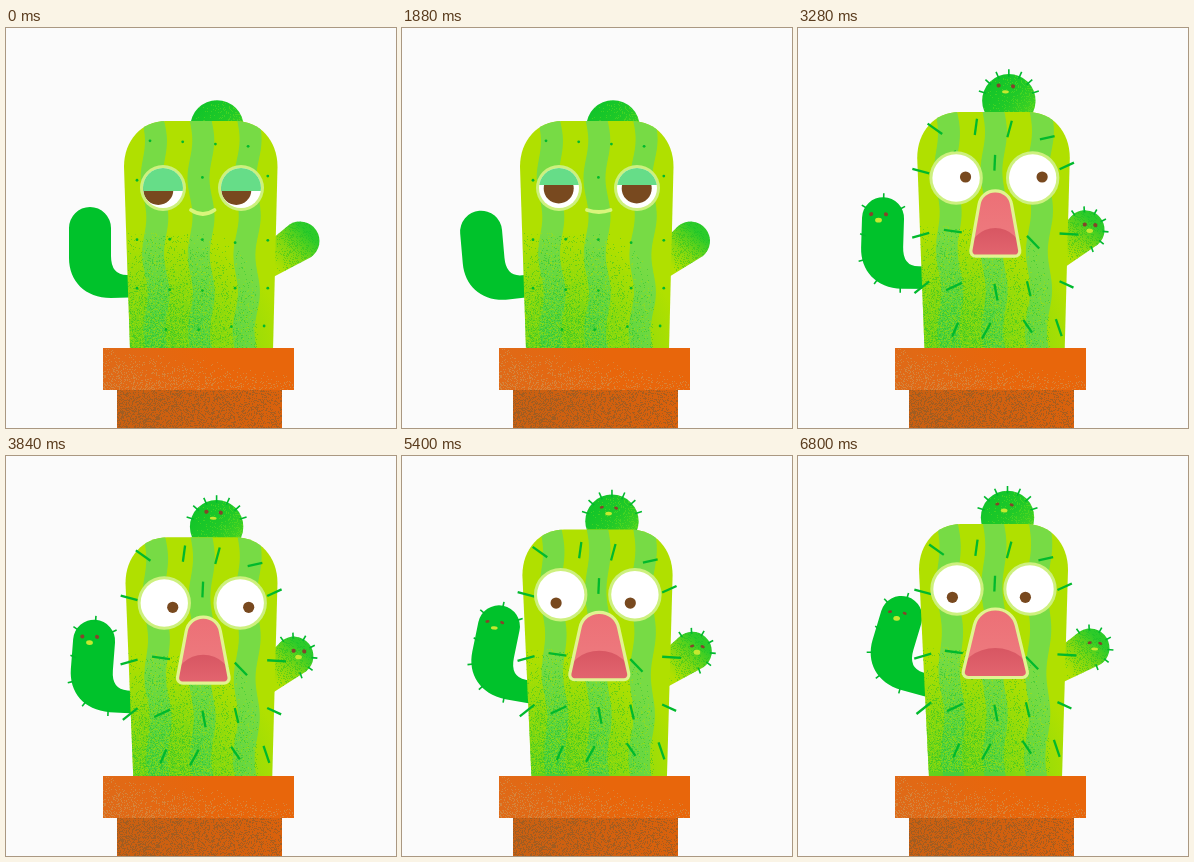
Recreate the animation shown at these times as an HTML page with a canvas. Size 390 by 400 pixels, loop 7000 ms.

```html
<!DOCTYPE html>
<html lang="en">
<head>
<meta charset="utf-8">
<title>Cactus</title>
<style>
html, body { margin: 0; width: 100%; height: 100%; overflow: hidden; background: #fbfbfb; }
canvas { display: block; width: 390px; height: 400px; }
</style>
</head>
<body>
<canvas id="stage"></canvas>
<script>
const LOOP = 7000, STEP = 40, LAST = 6800, JUMP = 2200;
const GREEN = '#00c22b', LIME = '#b0e000', STRIPE = '#77db45', SPIKE = '#00b92d', RING = '#cdf07e', BROWN = '#78491f';
const SOIL_Y = 322;

const canvas = document.getElementById('stage');
const dpr = window.devicePixelRatio || 1;
canvas.width = 390 * dpr;
canvas.height = 400 * dpr;
const c = canvas.getContext('2d');

const clamp = v => Math.max(0, Math.min(1, v));
const ramp = (t, a, b) => clamp((t - a) / (b - a));
const smooth = (t, a, b) => { const k = ramp(t, a, b); return k * k * (3 - 2 * k); };
const lerp = (a, b, k) => a + (b - a) * k;
const rad = deg => deg * Math.PI / 180;

// Calm, then a jolt upwards, a drop into a gasp, and a long slow strain
function poseAt(t) {
  const jump = 1 - (1 - ramp(t, JUMP, 2480)) ** 2;
  const drop = smooth(t, 2480, 2800);
  const strain = ramp(t, 2900, 6480);
  const sway = smooth(t, 0, 1900);
  const wake = smooth(t, 480, 840);
  const key = (calm, jolt, gasp, end) => lerp(lerp(calm, jolt, jump), lerp(gasp, end, strain), drop);
  const roll = rad(lerp(-6, 119, ramp(t, 3280, 5400)));
  return {
    top: key(93, 57, 86, 68),
    left: key(118, 119, 119, 121),
    right: key(271.5, 274.5, 272, 270),
    baseL: key(124, 132.5, 126, 131),
    baseR: key(267, 262, 267, 264),
    headX: key(211, 213, 211, 209.5),
    headY: key(99, 46, 74, 61.5),
    faceY: key(99, 44, 59, 48.5),
    armX: key(124, 127, 123, 125),
    armY: key(258, 218, 252, 228),
    armRot: rad(key(-5 * sway, 3, 0, 16.7)),
    tipX: key(294 - 5.5 * sway, 292, 286.5, 292),
    tipY: key(213, 198, 203, 192),
    rootY: key(237, 219, 229, 213),
    eyeY: key(160, 140, 152, 133),
    eyeL: key(157, 158, 158, 159),
    eyeR: key(235, 235, 235, 232),
    eyeSize: key(23, 23.5, 26.7, 26.7),
    lookX: lerp(lerp(lerp(-4.7, -0.3, wake), 6.5, jump), 9.5 * Math.cos(roll), drop),
    lookY: lerp(lerp(2, 0.5, wake), 9.5 * Math.sin(roll), drop),
    iris: key(15, 10, 5.6, 5.6),
    lid: lerp(lerp(3, -3, wake), -27, jump),
    smile: lerp(4, 2, wake),
    spikeY: key(7, -13, 1, -7),
    squeeze: key(1, 1, 1, 0.965),
    mTop: key(181, 159.5, 164, 153),
    mBot: key(187, 200.5, 229, 221.5),
    mTopW: key(6, 10, 13.5, 17),
    mBotW: key(13, 17, 24.5, 33.5)
  };
}

let seed = 7;
const random = () => (seed = (seed * 16807) % 2147483647) / 2147483647;

// Sprayed specks, denser where density(u, v) is higher
function grain(w, h, color, density) {
  const layer = document.createElement('canvas');
  layer.width = w;
  layer.height = h;
  const g = layer.getContext('2d');
  g.fillStyle = color;
  for (let y = 0; y < h; y++) {
    for (let x = 0; x < w; x++) {
      if (random() < density(x / w, y / h)) g.fillRect(x, y, 1, 1);
    }
  }
  return layer;
}
const spray = (u, v) => 0.34 * clamp(1.15 - Math.hypot((u - 0.25) * 1.2, 1 - v));
const bodyDark = grain(130, 125, 'rgba(30,190,45,.45)', spray);
const bodyLight = grain(130, 125, 'rgba(176,224,0,.5)', spray);
const headGrain = grain(54, 54, 'rgba(110,225,30,.45)', (u, v) => 0.35 * u * (0.4 + v));
const tipGrain = grain(50, 54, 'rgba(20,190,40,.4)', u => 0.3 * clamp(1.2 - Math.abs(u - 0.45) * 2));
const rimGrain = grain(191, 42, 'rgba(205,150,85,.6)', (u, v) => 0.3 * clamp(v * 1.1 - u * 0.75 + 0.1));
const potGrain = grain(165, 38, 'rgba(120,90,50,.5)', (u, v) => 0.38 - 0.15 * u + 0.05 * v);

// Staggered rows of spikes fanning out from the middle of the body
const spikes = [];
[108, 143, 205, 257, 292].forEach((y, row) => {
  const wide = row > 0 && row < 4;
  const first = wide ? 131 : 144 + row * 4;
  for (let i = 0; i < (wide ? 5 : 4); i++) {
    const x = first + 32.7 * i;
    const a = Math.atan2(y - 185, (x - 193) * 1.8) + (i % 2 ? 0.5 : -0.1);
    const len = 15 + 4 * random();
    spikes.push({ x, y: y + 8 * random() - 4, dx: Math.cos(a) * len, dy: Math.sin(a) * len });
  }
});

function fill(style) { c.fillStyle = style; c.fill(); }
function disc(x, y, r, style) {
  c.beginPath();
  c.arc(x, y, r, 0, 7);
  fill(style);
}
function line(x, y, dx, dy, width = 2.3) {
  c.lineWidth = width;
  c.strokeStyle = SPIKE;
  c.beginPath();
  c.moveTo(x, y);
  c.lineTo(x + dx, y + dy);
  c.stroke();
}
function gradient(x0, y0, x1, y1, ...colors) {
  const g = c.createLinearGradient(x0, y0, x1, y1);
  colors.forEach((color, i) => g.addColorStop(i / (colors.length - 1), color));
  return g;
}
function isolated(draw) {
  c.save();
  draw();
  c.restore();
}
// Evenly spread short spikes on an arc; degrees run clockwise from the top
function ringSpikes(x, y, r, from, to, count, len) {
  if (len <= 0) return;
  for (let i = 0; i < count; i++) {
    const a = rad(lerp(from, to, i / (count - 1)) - 90);
    const dx = Math.cos(a), dy = Math.sin(a);
    line(x + dx * r, y + dy * r, dx * len, dy * len, 1.6);
  }
}

function smallFace(x, y, gap, tilt, t, phase) {
  isolated(() => {
    c.translate(x, y);
    c.rotate(tilt);
    for (const side of [-1, 1]) {
      c.beginPath();
      c.ellipse(side * gap, 0, 2.1, t > 4000 ? 1.4 : 2, side * 0.3, 0, 7);
      fill('#84452a');
    }
    c.beginPath();
    c.ellipse(0, 6, 3.4, 2 + 0.5 * Math.sin(t / 90 + phase), 0, 0, 7);
    fill('#c5e82f');
  });
}

function drawHead(p, t) {
  const { headX: x, headY: y } = p;
  disc(x, y, 26.7, gradient(x - 20, y - 20, x + 22, y + 20, '#10c42a', '#20c928', '#4bd421'));
  isolated(() => {
    c.clip();
    c.drawImage(headGrain, x - 27, y - 27);
  });
  ringSpikes(x, y, 24, -72, 72, 7, 7.5 * ramp(t, 2300, 2420));
  const jolt = 1 - ramp(t, 2480, 2800);
  if (t >= 2400) smallFace(x - 3, p.faceY, 7.2, 0.06 + 0.2 * jolt, t, 0);
}

function drawLeftArm(p, t) {
  isolated(() => {
    c.translate(p.armX, p.armY);
    c.rotate(p.armRot);
    c.translate(-124, -258);
    c.beginPath();
    c.moveTo(63, 200);
    c.arc(84, 200, 21, Math.PI, 0);
    c.lineTo(105, 228);
    c.quadraticCurveTo(105, 247, 121, 247);
    c.lineTo(140, 247);
    c.lineTo(140, 269);
    c.lineTo(105, 270);
    c.bezierCurveTo(79, 270, 63, 253, 63, 230);
    c.closePath();
    fill(GREEN);
    const grow = ramp(t, 2340, 2460) * (1.6 - 0.6 * ramp(t, 2500, 2800));
    ringSpikes(84, 200, 19, -60, 60, 3, 6 * grow);
    ringSpikes(102, 231, 37, -182, -70, 4, 6 * grow);
    if (t >= 2600) {
      c.translate(84, 200);
      c.rotate(-p.armRot * 0.6);
      smallFace(-4.5, -4, 7.4, 0, t, 2);
    }
  });
}

function drawRightArm(p, t) {
  const { tipX: x, tipY: y, rootY } = p, rootX = 258;
  const a = Math.atan2(y - rootY, x - rootX);
  c.beginPath();
  c.arc(x, y, 19.5, a - Math.PI / 2, a + Math.PI / 2);
  c.arc(rootX, rootY, 15, a + Math.PI / 2, a - Math.PI / 2);
  c.closePath();
  fill(gradient(rootX + 10, rootY, x + 8, y - 8, LIME, '#7fd711', '#2ccb2a'));
  isolated(() => {
    c.clip();
    c.drawImage(tipGrain, x - 26, y - 24);
  });
  ringSpikes(x, y, 17.5, -35, 160, 7, 6 * ramp(t, 2560, 2680));
  if (t >= 2680) smallFace(x + 5, y - 5, 5.3, 0.06, t, 4);
}

function bodyPath(p) {
  const rx = 42, ry = 46, k = 0.42;
  c.beginPath();
  c.moveTo(p.baseL, SOIL_Y);
  c.lineTo(p.left, p.top + ry);
  c.bezierCurveTo(p.left, p.top + ry * k, p.left + rx * k, p.top, p.left + rx, p.top);
  c.lineTo(p.right - rx, p.top);
  c.bezierCurveTo(p.right - rx * k, p.top, p.right, p.top + ry * k, p.right, p.top + ry);
  c.lineTo(p.baseR, SOIL_Y);
  c.closePath();
}

// A wavy band that keeps its share of the body width
function stripePath(p, share) {
  const h = SOIL_Y - p.top, amp = 2.5 * 227 / h, n = 48;
  c.beginPath();
  for (let i = 0; i <= 2 * n + 1; i++) {
    const back = i > n;
    const u = (back ? 2 * n + 1 - i : i) / n;
    const mid = lerp(lerp(p.left, p.right, share), lerp(p.baseL, p.baseR, share), u);
    c.lineTo(mid + (back ? 11 : -11) * p.squeeze + amp * Math.sin(u * 6 * Math.PI), p.top + u * h);
  }
  c.closePath();
}

function drawBody(p, t) {
  isolated(() => {
    bodyPath(p);
    fill(LIME);
    c.clip();
    for (const share of [0.19, 0.5, 0.81]) {
      stripePath(p, share);
      fill(STRIPE);
    }
    const glowY = 330 + p.spikeY / 2;
    const shade = c.createRadialGradient(152, glowY, 8, 152, glowY, 130);
    shade.addColorStop(0, 'rgba(35,198,52,.58)');
    shade.addColorStop(0.45, 'rgba(40,200,50,.34)');
    shade.addColorStop(1, 'rgba(60,205,40,0)');
    c.fillStyle = shade;
    c.fillRect(110, 190, 175, 135);
    c.drawImage(bodyDark, 122, 198 + p.spikeY);
    c.drawImage(bodyLight, 122, 198 + p.spikeY);
  });

  const grow = ramp(t, JUMP, 2400);
  for (const s of spikes) {
    const x = 195 + (s.x - 195) * p.squeeze, y = s.y + p.spikeY;
    if (grow > 0) line(x, y, s.dx * grow, s.dy * grow);
    else disc(x, y, 1.4, SPIKE);
  }
}

function drawEye(x, p) {
  const y = p.eyeY, r = p.eyeSize;
  disc(x, y, r, RING);
  isolated(() => {
    disc(x, y, r - 3, '#fff');
    c.clip();
    disc(x + p.lookX, y + p.lookY, p.iris, BROWN);
    c.fillStyle = '#66dd88';
    c.fillRect(x - r, y - r, 2 * r, Math.max(0, r + p.lid));
  });
}

function drawSmile(p) {
  c.lineWidth = 3.8;
  c.strokeStyle = '#d9f57c';
  c.beginPath();
  c.moveTo(185, 182);
  c.quadraticCurveTo(197, 182 + 2 * p.smile, 208.5, 182);
  c.stroke();
}

// Domed trapezoid: the top corners are as round as its width allows
function drawOpenMouth(p) {
  const x = 197.3, { mTop: a, mBot: b, mTopW: tw, mBotW: bw } = p;
  const h = b - a;
  const dome = Math.min(h / 2, 0.98 * tw / Math.tan(Math.atan2(h, bw - tw) / 2));
  const corner = Math.min(5, h / 3);
  const mouth = new Path2D();
  mouth.moveTo(x, a);
  mouth.arcTo(x + tw, a, x + bw, b, dome);
  mouth.arcTo(x + bw, b, x - bw, b, corner);
  mouth.arcTo(x - bw, b, x - tw, a, corner);
  mouth.arcTo(x - tw, a, x, a, dome);
  mouth.closePath();
  isolated(() => {
    c.clip(mouth);
    c.fillStyle = gradient(x, a, x, b, '#ec7076', '#ee7d81');
    c.fillRect(x - bw, a, 2 * bw, h);
    c.beginPath();
    c.ellipse(x, b - 2, bw * 1.05, h * 0.4, 0, 0, 7);
    fill(gradient(x, b - h * 0.45, x, b, '#d75662', '#e3656f'));
  });
  c.lineWidth = 3.2;
  c.strokeStyle = '#e1f391';
  c.stroke(mouth);
}

function drawPot() {
  c.fillStyle = gradient(111, 400, 276, 362, '#c96012', '#d0600f', '#da620c');
  c.fillRect(111, 362, 165, 38);
  c.drawImage(potGrain, 111, 362);
  c.fillStyle = gradient(110, 366, 200, 320, '#df6a18', '#e8660b');
  c.fillRect(97, 320, 191, 42);
  c.drawImage(rimGrain, 97, 320);
}

function draw(t) {
  const p = poseAt(t);
  c.setTransform(dpr, 0, 0, dpr, 0, 0);
  c.imageSmoothingEnabled = false;
  c.fillStyle = '#fbfbfb';
  c.fillRect(0, 0, 390, 400);
  drawHead(p, t);
  drawLeftArm(p, t);
  drawRightArm(p, t);
  drawBody(p, t);
  drawEye(p.eyeL, p);
  drawEye(p.eyeR, p);
  isolated(() => {
    c.lineCap = c.lineJoin = 'round';
    if (t <= JUMP) drawSmile(p);
    else drawOpenMouth(p);
  });
  drawPot();
}

const start = performance.now();
function tick() {
  const t = Math.max(0, performance.now() - start) % LOOP;
  draw(Math.min(LAST, Math.floor(t / STEP) * STEP));
  requestAnimationFrame(tick);
}
tick();
</script>
</body>
</html>
```
